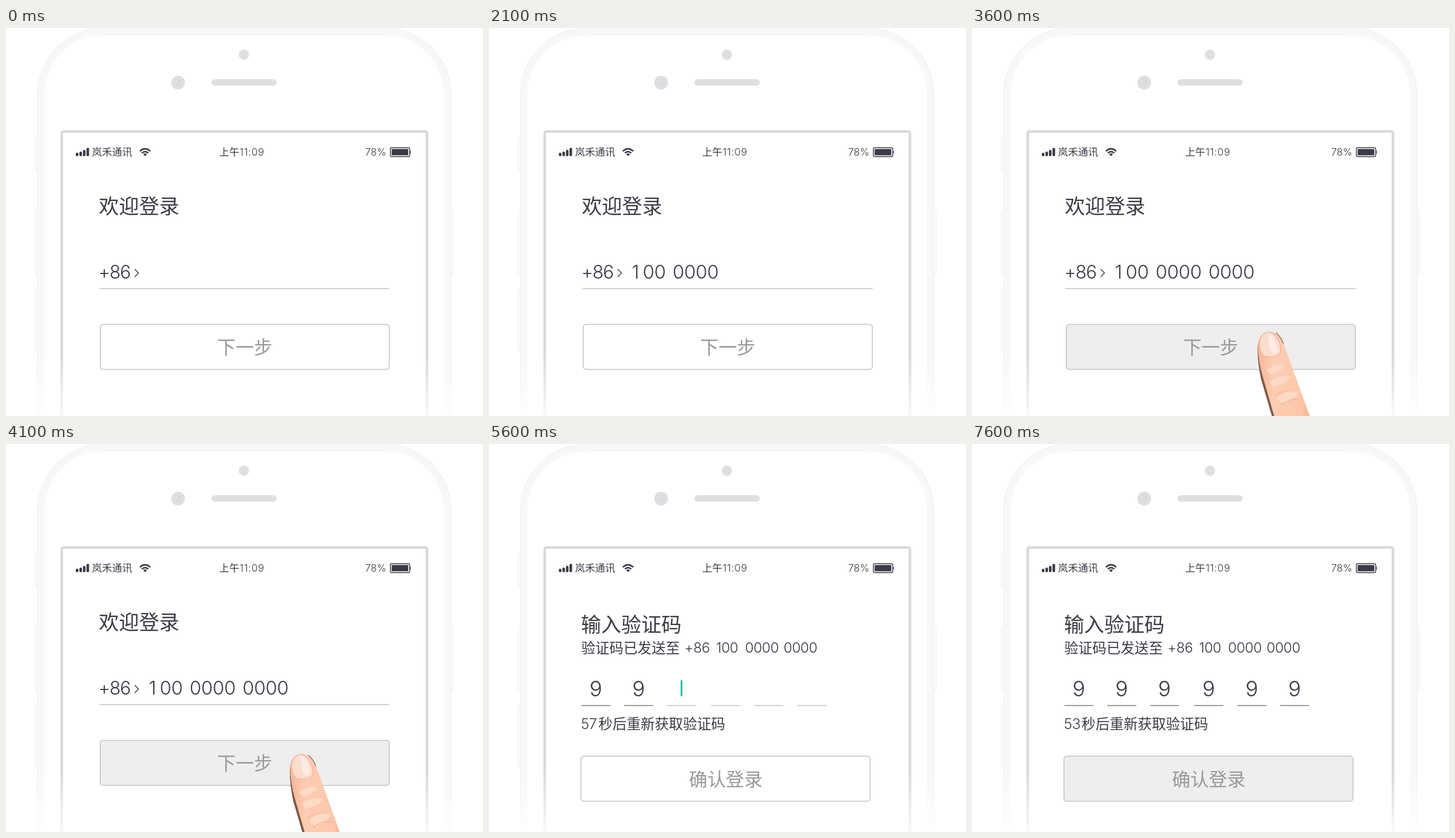
Write an HTML page that moves like this. It is 830 by 675 pixels and loops after 8000 ms.

```html
<!DOCTYPE html>
<html lang="zh-CN">
<head>
<meta charset="utf-8">
<title>登录演示</title>
<style>
  html, body { margin: 0; width: 100%; height: 100%; overflow: hidden; background: #fff; }
  svg { display: block; width: 830px; height: 675px; }
  text { font-family: Inter, "Noto Sans CJK SC", "Noto Sans CJK", sans-serif; font-weight: 300; fill: #3b3b48; }
  .han { font-family: "Noto Sans CJK SC", "Noto Sans CJK", sans-serif; }
  .title { font-size: 35px; font-weight: 350; }
  .status { font-size: 17.5px; }
  .note { font-size: 24.5px; }
  .label { font-size: 32px; fill: #999; text-anchor: middle; }
  .mid text { text-anchor: middle; }
  .box { stroke: #c2c2c2; stroke-width: 1.5; }
  .dark { fill: #3b3b48; }
</style>
</head>
<body>
<svg viewBox="0 0 830 675">
  <defs>
    <linearGradient id="fade" x1="0" y1="0" x2="0" y2="1">
      <stop offset="0" stop-color="#fff" stop-opacity="0"/>
      <stop offset="1" stop-color="#fff" stop-opacity=".85"/>
    </linearGradient>
    <linearGradient id="skin">
      <stop offset="0" stop-color="#f5b598"/>
      <stop offset=".3" stop-color="#fdcdb2"/>
      <stop offset=".8" stop-color="#fdc8aa"/>
      <stop offset="1" stop-color="#f6b391"/>
    </linearGradient>
  </defs>

  <!-- Phone body -->
  <g fill="#fdfdfd" stroke="#efefef" stroke-width="1.5">
    <rect x="51" y="191" width="6" height="57" rx="2"/>
    <rect x="51" y="318" width="6" height="109" rx="2"/>
    <rect x="51" y="454" width="6" height="108" rx="2"/>
    <rect x="772" y="318" width="6" height="109" rx="2"/>
    <rect x="55" y="0" width="719" height="800" rx="116" fill="#f9fafa" stroke="#f1f2f2" stroke-width="2"/>
    <rect x="60" y="5" width="709" height="800" rx="111" fill="none" stroke="#f6f8f7" stroke-width="5"/>
    <rect x="65.5" y="11" width="698" height="800" rx="105" fill="#fff" stroke="#f3f4f4"/>
  </g>
  <g fill="#dfdfe0">
    <circle cx="414" cy="46.500" r="9"/>
    <circle cx="299.500" cy="95" r="12"/>
    <circle cx="299.500" cy="95" r="6.500" fill="#d9dade"/>
    <circle cx="296.500" cy="93" r="1.500" fill="#eee"/>
    <rect x="357.500" y="89" width="113.500" height="11.500" rx="5.700"/>
  </g>
  <rect x="97" y="180" width="635.500" height="560" rx="3" fill="#fff" stroke="#d9d9da" stroke-width="4.600"/>
  <rect y="570" width="830" height="105" fill="url(#fade)"/>

  <!-- Status bar -->
  <g class="dark">
    <rect x="121.500" y="217" width="4.500" height="6" rx="2"/>
    <rect x="127.700" y="215" width="4.500" height="8" rx="2"/>
    <rect x="133.900" y="212" width="4.500" height="11" rx="2"/>
    <rect x="140.100" y="208.500" width="4.500" height="14.500" rx="2"/>
    <path d="M242 223l-3.300-3.500q3.300-2.600 6.600 0z"/>
    <rect x="671" y="210.500" width="29" height="11" rx="1"/>
    <path d="M702.500 213q2 .5 2 3t-2 3z"/>
  </g>
  <g fill="none" stroke="#3b3b48">
    <path stroke-width="2.600" d="M233 214.300q9-8.200 18 0M236.400 217.600q5.600-4.800 11.200 0"/>
    <rect x="668.800" y="208.300" width="33.700" height="15.400" rx="2.500" stroke-width="1.500"/>
  </g>
  <text class="han status" x="149.500" y="222">岚禾通讯</text>
  <text class="han status" x="371" y="222">上午</text>
  <text class="status" x="406.500" y="222" letter-spacing=".6">11:09</text>
  <text class="status" x="625" y="222">78%</text>

  <!-- Phone number screen -->
  <g id="login">
    <text class="han title" x="161.500" y="323">欢迎登录</text>
    <text x="160.500" y="436" font-size="32" letter-spacing="-1.300">+86</text>
    <path d="M224 419.500l6.500 6.700-6.500 6.700" fill="none" stroke="#3b3b48" stroke-width="1.500"/>
    <g id="phone" class="mid" font-size="33"></g>
    <rect x="162.500" y="452.700" width="505" height="1.400" fill="#bdbdbd"/>
    <rect id="next" class="box" x="164" y="515.500" width="503" height="78.500" rx="5"/>
    <text class="han label" x="415.500" y="567">下一步</text>
    <g id="finger">
      <path d="M494 572C492 555 500 539 514 539C526 539 535 548 540 562L586 690H524L503 620Q496 592 494 572Z" fill="url(#skin)"/>
      <path d="M494 562Q495 590 503 618L524 690H520L500 622Q493 590 494 562Z" fill="#7d5a48"/>
      <path d="M526 541Q535 549 539 560" fill="none" stroke="#9a6c55" stroke-width="1.500"/>
      <path d="M497 562Q497 542 513 540Q527 541 533 563Q537 577 528 581Q516 585 505 581Q498 576 497 562Z" fill="#fbddce" stroke="#eeb399" stroke-width="1.200"/>
      <path d="M512 543Q522 543 527 562Q531 574 525 577Q516 578 515 566Z" fill="#fdece3"/>
      <g fill="#fee0cf" opacity=".75">
        <path d="M509 606Q524 594 541 598Q535 609 516 613Z"/>
        <path d="M515 626Q532 614 552 617Q545 630 520 634Z"/>
        <path d="M527 655Q545 638 564 645Q562 656 538 665Z"/>
      </g>
      <path d="M524 651Q535 642 549 642M535 667Q552 653 568 659" fill="none" stroke="#f0ae8d" stroke-width="1.200"/>
    </g>
  </g>

  <!-- Verification code screen -->
  <g id="verify">
    <text class="han title" x="160" y="327">输入验证码</text>
    <text class="han note" x="160.500" y="363.500">验证码已发送至</text>
    <g font-size="24.500" letter-spacing="-.5">
      <text x="340" y="363">+86</text>
      <text x="395" y="363">100</text>
      <text x="445.500" y="363">0000</text>
      <text x="512.500" y="363">0000</text>
    </g>
    <g id="code" class="mid" font-size="37"></g>
    <rect id="cursor" y="411" width="3" height="28" fill="#20b9a4"/>
    <text id="seconds" x="160" y="496" font-size="25" letter-spacing="-.6"></text>
    <text class="han note" x="190.500" y="496">秒后重新获取验证码</text>
    <rect id="confirm" class="box" x="160" y="543" width="503" height="78.500" rx="5"/>
    <text class="han label" x="412" y="595">确认登录</text>
  </g>
</svg>
<script>
  const LOOP = 8000, KEY_STEP = 300, FINGER_IN = 3600, PRESS = 4100, VERIFY = 4600, CODE_STEP = 500;
  const slots = [186, 260.5, 335, 412, 487, 561.5];
  const get = id => document.getElementById(id);
  const show = (node, on) => node.setAttribute('display', on ? 'inline' : 'none');

  function add(parent, tag, attrs, content = '') {
    const node = document.createElementNS('http://www.w3.org/2000/svg', tag);
    for (const name in attrs) node.setAttribute(name, attrs[name]);
    node.textContent = content;
    return parent.appendChild(node);
  }

  // Digits sit 20px apart, with a 12px gap before each group of four.
  const phoneDigits = [...'10000000000'].map((digit, i) => {
    const gaps = (i > 2) + (i > 6);
    const x = i ? 257.7 + 20 * i + 12 * gaps : 255;
    return add(get('phone'), 'text', { x, y: 435.5 }, digit);
  });

  const codeDigits = slots.map(x => add(get('code'), 'text', { x, y: 439 }, '9'));
  const codeLines = slots.map(x =>
    add(get('code'), 'rect', { x: x - 25.3, y: 454.3, width: 50.6, height: 1.4 }));

  function draw(t) {
    const verifying = t >= VERIFY;
    show(get('login'), !verifying);
    show(get('verify'), verifying);

    const typed = Math.floor(t / KEY_STEP);
    phoneDigits.forEach((node, i) => show(node, i < typed));
    get('next').setAttribute('fill', typed >= phoneDigits.length ? '#eee' : '#fff');
    show(get('finger'), t >= FINGER_IN);
    get('finger').setAttribute('transform', t < PRESS ? 'translate(3 -11)' : '');

    const entered = Math.max(0, Math.floor((t - VERIFY) / CODE_STEP));
    const complete = entered >= slots.length;
    codeDigits.forEach((node, i) => show(node, i < entered));
    codeLines.forEach((node, i) =>
      node.setAttribute('fill', i < Math.max(1, entered) ? '#777' : '#bdbdbd'));
    show(get('cursor'), !complete);
    if (!complete) get('cursor').setAttribute('x', slots[entered] - 1.5);
    get('seconds').textContent = 59 - entered;
    get('confirm').setAttribute('fill', complete ? '#eee' : '#fff');
  }

  function frame() {
    draw(performance.now() % LOOP);
    requestAnimationFrame(frame);
  }
  frame();
</script>
</body>
</html>
```
